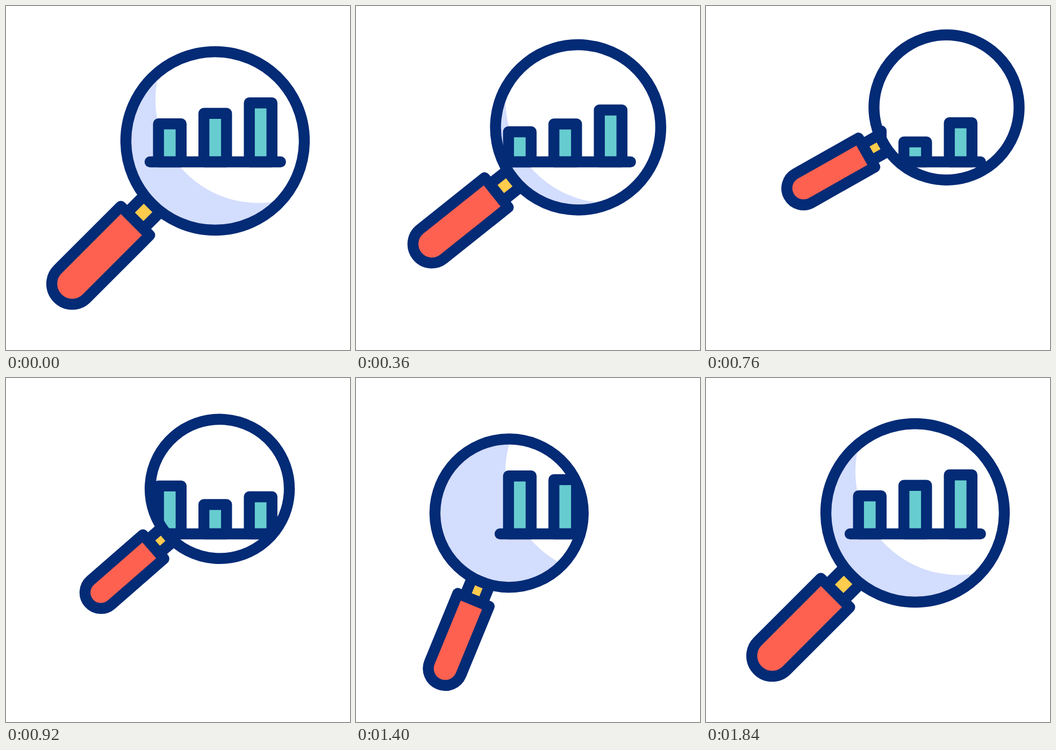
These frames come from a looping animation (640x640 px, 2000 ms). An HTML page:

```html
<!DOCTYPE html>
<html lang="en">
<head>
<meta charset="utf-8">
<title>Magnified chart</title>
<style>
  html, body { margin: 0; width: 100%; height: 100%; overflow: hidden; background: #fff; }
  svg { display: block; width: 640px; height: 640px; }
  .line { stroke: #032b76; stroke-width: 20.4; stroke-linejoin: round; stroke-linecap: round; }
  #glass .line { vector-effect: non-scaling-stroke; }
</style>
</head>
<body>
<svg viewBox="0 0 640 640">
  <defs>
    <clipPath id="lens"><circle id="lensClip"/></clipPath>
  </defs>
  <g clip-path="url(#lens)">
    <rect width="640" height="640" fill="#d3ddfd"/>
    <circle cx="470" cy="174.5" r="192" fill="#fff"/>
    <g id="bars" fill="#67ccd0"></g>
    <path class="line" d="M268 290H510.7"/>
  </g>
  <g id="glass">
    <path class="line" fill="#ffcc4d" d="M166-21.4H210V21.4H166Z"/>
    <path class="line" fill="#ff6150" d="M210-38H376A38 38 0 0 1 376 38H210Z"/>
    <circle class="line" r="166" fill="none"/>
  </g>
</svg>
<script>
const LOOP = 2000, STEP = 40, RADIUS = 166, HALF_LINE = 10.2, BASE = 290;

const smooth = u => u * u * (3 - 2 * u);
const clamp = u => Math.min(Math.max(u, 0), 1);

// Eases from each value to the next between the matching times
const track = (times, values) => t => values.reduce((sum, value, i) =>
  i === 0 ? value
    : sum + (value - values[i - 1]) * smooth(clamp((t - times[i - 1]) / (times[i] - times[i - 1]))), 0);

// The glass rests, swings up right, sweeps down left and returns
const swing = [80, 726, 1273, 1840];
const lens = {
  x: track(swing, [389, 449.5, 269.5, 389]),
  y: track(swing, [251, 188, 251.5, 251]),
  angle: track(swing, [45, 29, 71, 45]),
  scale: track([80, 726, 1000, 1273, 1840], [1, .815, .771, .806, 1])
};

const late = [119, 711, 1304, 1840];
const barTops = [
  track([140, 590, 1135, 1250, 1840], [209, 239.6, 165, 165, 209]),
  track(late, [189.5, 244, 178, 189.5]),
  track(late, [170, 206.8, 221, 170])
];

const get = id => document.getElementById(id);
const set = (el, attrs) => { for (const k in attrs) el.setAttribute(k, attrs[k]); };

const bars = barTops.map((_, i) => {
  const bar = document.createElementNS("http://www.w3.org/2000/svg", "rect");
  set(bar, { class: "line", x: 283.7 + 84.5 * i, width: 42.1 });
  return get("bars").appendChild(bar);
});

function draw(t) {
  const x = lens.x(t), y = lens.y(t), scale = lens.scale(t);
  set(get("glass"), {
    transform: `translate(${x} ${y}) rotate(${180 - lens.angle(t)}) scale(${scale})`
  });
  set(get("lensClip"), { cx: x, cy: y, r: RADIUS * scale });
  bars.forEach((bar, i) => {
    const top = barTops[i](t) + HALF_LINE;
    set(bar, { y: top, height: BASE - top });
  });
}

const origin = performance.now();
function tick() {
  const time = (performance.now() - origin) % LOOP;
  draw(Math.floor(time / STEP) * STEP);
  requestAnimationFrame(tick);
}
tick();
</script>
</body>
</html>
```
